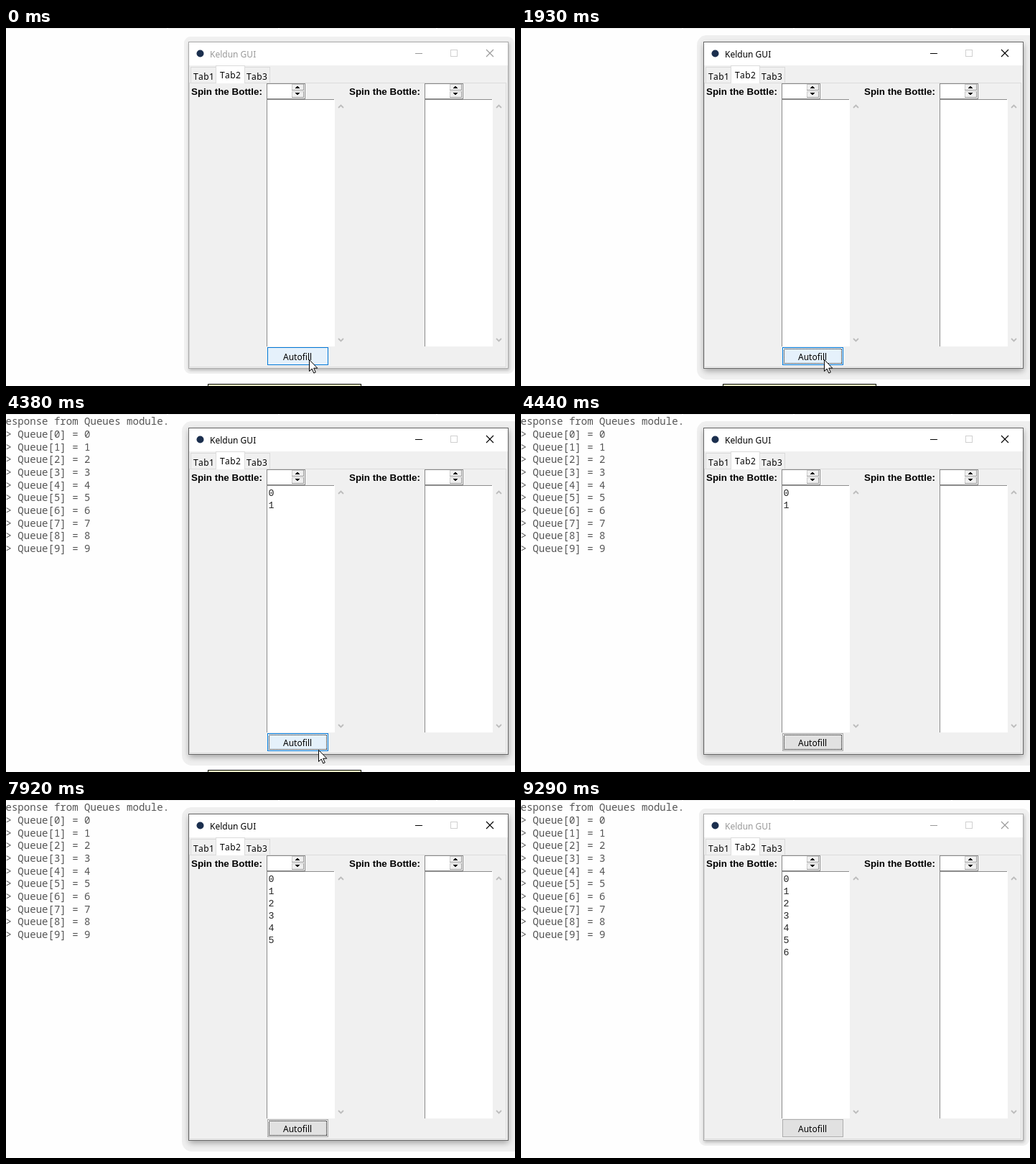
An HTML page for the animation above (9420 ms loop, 709 px wide and 498 px high).

```html
<!DOCTYPE html>
<html lang="en">
<head>
<meta charset="utf-8">
<title>Autofill window</title>
<style>
  html, body { margin: 0; width: 100%; height: 100%; overflow: hidden; background: #fefefe; }
  svg { display: block; font: 12px "Noto Sans", sans-serif; }
  text { white-space: pre; }
  .crisp { shape-rendering: crispEdges; }
  .console { font: 14.05px "Noto Sans Mono", monospace; fill: #555; }
  .label { font: bold 13.4px "Liberation Sans", Arial, sans-serif; }
  .digits { font: 13.33px "Liberation Mono", monospace; fill: #222; }
  .tabs text { letter-spacing: .4px; font-kerning: none; }

  svg { --ink: #999; --frame: #aaa; --face: #e1e1e1; --edge: #adadad; }
  svg.active { --ink: #000; --frame: #666; }
  svg.hover { --face: #e5f1fb; --edge: #0078d7; }
  svg.pressed { --face: #cce4f7; --edge: #005499; }
  .frame { stroke: var(--frame); }
  .ink { stroke: var(--ink); }
  .title { fill: var(--ink); }
  .button { fill: var(--face); stroke: var(--edge); }
  .active .shadow-far, svg:not(.active) .shadow-near { display: block; }
  .shadow-far, .shadow-near { display: none; }
</style>
</head>
<body>
<svg id="stage" width="709" height="498" viewBox="0 0 709 498">
  <defs>
    <filter id="blur" x="-10%" y="-10%" width="120%" height="120%"><feGaussianBlur stdDeviation="4"/></filter>
    <filter id="soft" x="-10%" y="-10%" width="120%" height="120%"><feGaussianBlur stdDeviation="2"/></filter>

    <g id="spinButton">
      <path d="M398 78h17v9h-17z" fill="#f0f0f0"/>
      <path d="M398.5 87v-8.500h16" fill="none" stroke="#ccc"/>
      <path d="M398 86.500h16.500V78" fill="none" stroke="#999"/>
    </g>

    <g id="panel">
      <text class="label" x="258" y="93">Spin the Bottle:</text>
      <g class="crisp">
        <path d="M363.500 77.500h53v21h-53z" fill="#fff" stroke="#888"/>
        <use href="#spinButton"/>
        <use href="#spinButton" y="10"/>
        <path d="M403 84h6v-1h-1v-1h-1v-1h-2v1h-1v1h-1zM403 90h6v1h-1v1h-1v1h-2v-1h-1v-1h-1z"/>
        <path d="M363 99h95v344h-95z" fill="#fff"/>
        <path d="M363.500 443V99.500H457" fill="none" stroke="#8c8c8c"/>
      </g>
      <path d="M463 111l3.500-3.500 3.500 3.500M463 432l3.500 3.500 3.500-3.500" fill="none" stroke="#bdbdbd" stroke-width="1.800"/>
    </g>
  </defs>

  <path class="crisp" d="M0 .5h709" stroke="#ececec"/>
  <path class="crisp" d="M224 .5h2M379 .5h2M599 .5h2" stroke="#fff"/>
  <g id="console" class="console"></g>

  <g class="shadow-far">
    <rect x="245" y="10" width="476" height="479" rx="14" fill="#efefef"/>
    <rect x="255" y="23" width="445" height="454" opacity=".33" filter="url(#blur)"/>
  </g>
  <g class="shadow-near">
    <rect x="248" y="12" width="460" height="469" rx="9" fill="#f0f0f0"/>
    <rect x="255" y="21" width="446" height="455" opacity=".25" filter="url(#soft)"/>
  </g>

  <g class="crisp">
    <path d="M254 19h446v455H254z" fill="#f0f0f0"/>
    <path d="M255 20h444v32H255z" fill="#fff"/>
    <path class="frame" d="M254.500 19.500h445v454h-445z" fill="none"/>
    <path d="M255.500 76.500h441v395h-441z" fill="none" stroke="#dcdcdc"/>
    <path d="M257.500 76V54.500h35V76M332.500 54.500h35V76" fill="none" stroke="#d9d9d9"/>
    <path d="M293 52h39v25h-39z" fill="#fff"/>
    <path d="M292.500 77V52.500h40V77" fill="none" stroke="#dcdcdc"/>
    <path class="ink" d="M570 35.500h10"/>
    <path d="M619.500 30.500h9v9h-9z" fill="none" stroke="#d0d0d0"/>
  </g>
  <path class="ink" d="M669 30l10 10M679 30l-10 10" stroke-width="1.100"/>
  <circle cx="270.500" cy="35.500" r="5" fill="#1b2f4e"/>
  <text class="title" x="284" y="41">Keldun GUI</text>
  <g class="tabs">
    <text x="261" y="72">Tab1</text>
    <text x="298" y="70">Tab2</text>
    <text x="335" y="72">Tab3</text>
  </g>

  <use href="#panel"/>
  <use href="#panel" x="220"/>
  <g id="digits" class="digits"></g>

  <rect class="button crisp" x="364.500" y="444.500" width="84" height="24"/>
  <rect id="focus" class="crisp" x="366.500" y="446.500" width="80" height="20" fill="none" stroke="#000" stroke-dasharray="1"/>
  <text x="386" y="462">Autofill</text>

  <path id="tooltip" class="crisp" d="M281.500 499v-3.500h213v3.500" fill="#f2fbc4" stroke="#000"/>
  <path id="cursor" d="M.5 .5v16l3.700-3.500 2.600 6 2.500-1.100-2.600-5.700h5.100z" fill="#fff" stroke="#000"/>
</svg>

<script>
const LOOP = 9420;
const PRESS = 1750, RELEASE = 1930, PRINT = 1970, MOVE = 4380, LEAVE = 4440, BLUR = 9290;
const digitTimes = [2950, 3950, 4930, 5920, 6920, 7920, 8920];

const byId = id => document.getElementById(id);
const stage = byId('stage'), output = byId('console'), digitList = byId('digits');
const focusRing = byId('focus'), tooltip = byId('tooltip'), cursor = byId('cursor');

function addText(parent, x, y, content) {
  const text = document.createElementNS('http://www.w3.org/2000/svg', 'text');
  text.setAttribute('x', x);
  text.setAttribute('y', y);
  text.textContent = content;
  return parent.appendChild(text);
}

const show = (element, visible) => { element.style.display = visible ? '' : 'none'; };

addText(output, -0.5, 15, 'esponse from Queues module.');
for (let i = 0; i < 10; i++) addText(output, -0.5, 33 + i * 17.67, `> Queue[${i}] = ${i}`);
const digits = digitTimes.map((_, i) => addText(digitList, 365.5, 114 + i * 17, i));

function render() {
  const t = performance.now() % LOOP;
  const active = t >= PRESS && t < BLUR;
  const over = t < LEAVE;

  let state = active ? 'active' : '';
  if (over) state += t >= PRESS && t < RELEASE ? ' pressed' : ' hover';
  stage.setAttribute('class', state);

  show(focusRing, active);
  show(output, t >= PRINT);
  show(tooltip, over);
  show(cursor, over);
  cursor.setAttribute('transform', t < MOVE ? 'translate(422 461)' : 'translate(435 467)');
  digits.forEach((digit, i) => show(digit, t >= digitTimes[i]));
  requestAnimationFrame(render);
}
render();
</script>
</body>
</html>
```
